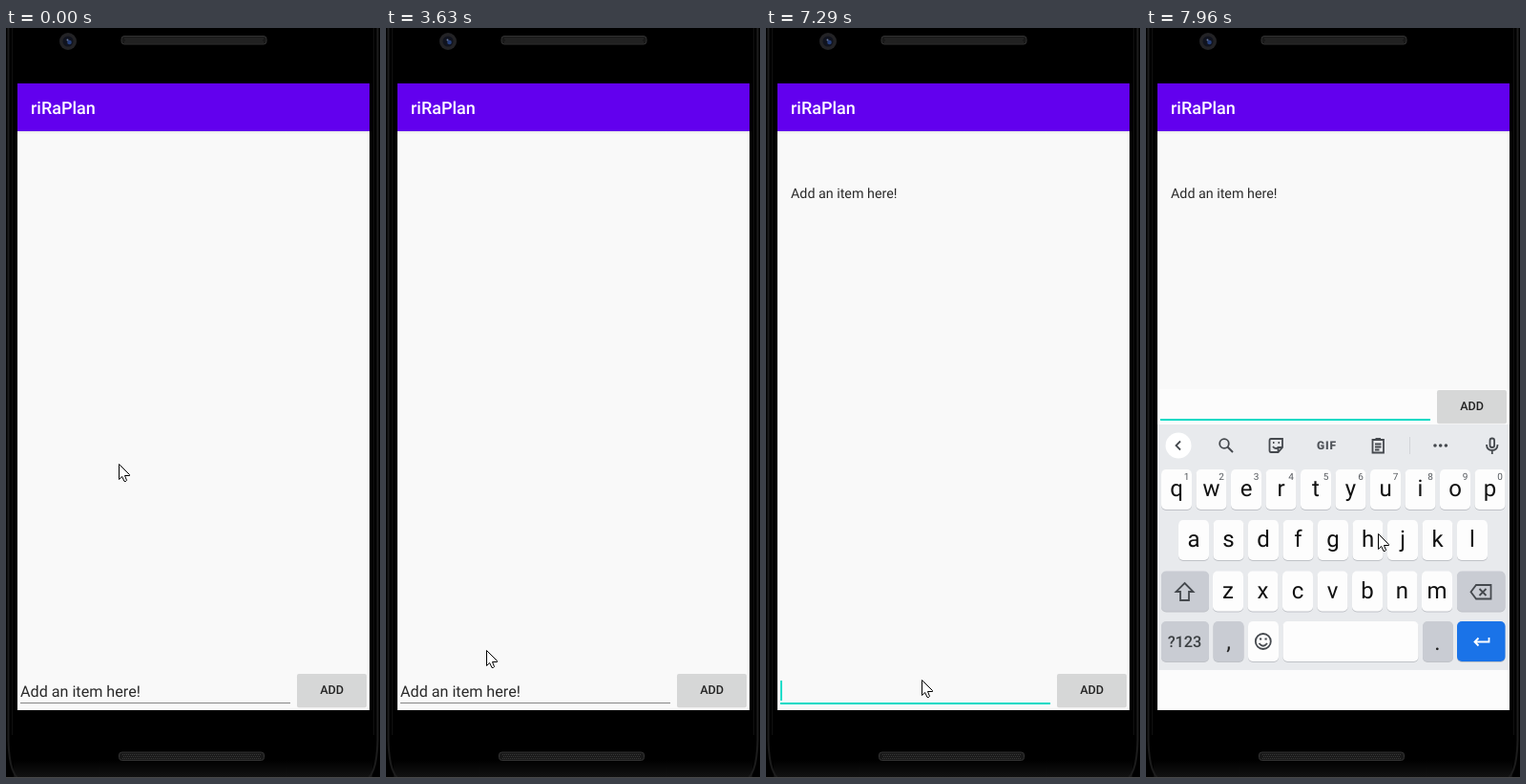
Recreate the animation shown at these times as an HTML page. Size 392 by 785 pixels, loop 8 s.

```html
<!DOCTYPE html>
<html lang="en">
<head>
<meta charset="utf-8">
<title>List app</title>
<style>
html, body { margin: 0; width: 100%; height: 100%; overflow: hidden; background: #000; }
svg { display: block; width: 100%; height: 100%; font-family: Roboto, sans-serif; text-rendering: geometricPrecision; }
.mid { text-anchor: middle; }
.med { font-weight: 500; }
.line { fill: none; stroke: #45494e; stroke-width: 1.8; }
</style>
</head>
<body>
<svg viewBox="0 0 392 785">
  <defs>
    <clipPath id="screen"><path d="M12 58H381V714H12Z"/></clipPath>
    <linearGradient id="drop" x2="0" y2="1"><stop stop-color="#e6e6e6"/><stop offset="1" stop-color="#f9f9f9"/></linearGradient>
    <linearGradient id="base" x2="0" y2="1"><stop stop-color="#000"/><stop offset="1" stop-color="#121212"/></linearGradient>
    <g id="mesh">
      <rect x=".5" y=".5" width="152" height="8.5" rx="3" fill="#191919" stroke="#333"/>
      <path d="M4 3H149M5 5H149M4 7H149" stroke="#383838" stroke-dasharray="1 1"/>
    </g>
  </defs>

  <!-- phone body -->
  <path d="M8 766H384V784H8Z" fill="url(#base)"/>
  <path d="M2.5 0V745Q3 776 12 785M389.5 0V745Q389 776 380 785" fill="none" stroke="#1c1c1c" stroke-width="2"/>
  <path d="M6.5 0V740M385.5 0V740" stroke="#101010"/>
  <path d="M0 784.5H392" stroke="#484848"/>
  <use href="#mesh" x="120.5" y="8"/>
  <use href="#mesh" x="118" y="757.5"/>
  <circle cx="65" cy="14" r="9" fill="#232326"/>
  <circle cx="65" cy="14" r="5.5" fill="#10131e"/>
  <circle cx="66.5" cy="15" r="2.3" fill="#263f7c"/>
  <circle cx="64.5" cy="12.5" r="1" fill="#6f83b0"/>

  <g clip-path="url(#screen)">
    <path d="M12 58H381V714H12Z" fill="#f9f9f9"/>
    <path d="M12 58H381V108H12Z" fill="#6200ee"/>
    <path d="M12 108H381V111H12Z" fill="url(#drop)"/>
    <text class="med" x="26" y="90" font-size="18" fill="#fff">riRaPlan</text>
    <text id="item" x="26" y="178" font-size="14.3" fill="#2a2a2a">Add an item here!</text>
    <path id="blank" d="M12 378H381V714H12Z" fill="#fcfcfc"/>
    <g id="row">
      <text id="entry" x="15" y="699.5" font-size="16.15" fill="#2a2a2a">Add an item here!</text>
      <path id="rule"/>
      <path id="caret" d="M16 683V704" stroke="#03dac5" stroke-width="1.8"/>
      <rect x="305" y="677.3" width="73" height="34" rx="2" fill="#000" opacity=".14"/>
      <rect x="305" y="676" width="73" height="34" rx="2" fill="#d6d7d7"/>
      <rect id="press" x="305" y="676" width="73.5" height="36" rx="2"/>
      <text class="mid med" x="341.5" y="697" font-size="12.56" fill="#222">ADD</text>
    </g>
    <g id="board">
      <path d="M12 415H381V672H12Z" fill="#e8eaed"/>
      <g id="keys"></g>
      <circle cx="34" cy="437" r="13.5" fill="#fff"/>
      <g class="line">
        <path d="M36 432.5L31.5 437L36 441.5"/>
        <circle cx="82" cy="435" r="4.8"/><path d="M85.5 438.5L91 444" stroke-width="2"/>
        <path d="M131 430H143V439L138.5 444H131Q129.5 444 129.5 442V432Q129.5 430 131 430ZM143 439H138.5V444M133 438Q135 441 138 439.5M133 434H134.5M138.5 434H140"/>
        <path d="M237.5 431H249V444.5H237.5ZM240 435.5H246.5M240 438.5H246.5M240 441.5H244.5"/>
        <path d="M240.5 430.5H246" stroke-width="3"/>
        <path d="M276.5 428V446" stroke="#d3d5d9" stroke-width="1"/>
        <path d="M303 437H316" stroke-width="3.6" stroke-linecap="round" stroke-dasharray="0 5.7"/>
        <rect x="360.5" y="429.5" width="4.6" height="9.5" rx="2.3"/>
        <path d="M357 436Q357 442 362.8 442Q368.5 442 368.5 436M362.8 442V446"/>
        <path d="M40.5 581L49.5 590H45V599H36V590H31.5Z"/>
        <path d="M346 583H361.5V597.5H346L340.5 590.2ZM349.5 587L356.5 594M356.5 587L349.5 594"/>
        <circle cx="122.8" cy="642" r="8"/>
        <path d="M118.5 644Q122.8 649.5 127 644"/>
        <path d="M119 639.5H121.2M124.5 639.5H126.7" stroke-width="2.2"/>
        <path d="M359.5 638V642.5H344.5M348.5 638.5L344.5 642.5L348.5 646.5" stroke="#fff"/>
      </g>
      <text class="mid" x="189.5" y="441.3" font-size="12" font-weight="900" letter-spacing=".8" fill="#50545a">GIF</text>
    </g>
  </g>
  <path id="arrow" d="M.5 .5V16.5L3.7 13.5L6 18.5H7.5L8.5 17.5L6.5 12.5H11.5V11.5Z" fill="#fff" stroke="#000" stroke-linejoin="round"/>
</svg>

<script>
const $ = id => document.getElementById(id);
const LOOP = 8000;

// Keyboard
const GREY = "#c9ccd3", WHITE = "#fdfdfd";
let keys = "";
function key(x, y, w, fill = WHITE) {
  const box = (dy, color) => `<rect x="${x}" y="${y + dy}" width="${w}" height="42" rx="5" fill="${color}"/>`;
  keys += box(1, "#bfc2c7") + box(0, fill);
}
function label(text, x, y, size = 24, fill = "#111", cls = "mid") {
  keys += `<text class="${cls}" x="${x}" y="${y}" font-size="${size}" fill="${fill}">${text}</text>`;
}
[["qwertyuiop", 32, 462], ["asdfghjkl", 50, 515], ["zxcvbnm", 86, 568.5]].forEach(([letters, x0, y], row) => {
  [...letters].forEach((c, i) => {
    const x = x0 + i * 36.5;
    key(x - 16, y, 32);
    label(c, x, y + 28);
    if (!row) label((i + 1) % 10, x + 10.5, y + 11, 10, "#55595e");
  });
});
key(16, 568.5, 50, GREY);
key(326, 568.5, 50.5, GREY);
key(16, 621, 50, GREY);
key(70.5, 621, 32, GREY);
key(107, 621, 32);
key(143.5, 621, 142);
key(290, 621, 32, GREY);
key(326, 621, 50.5, "#1a73e8");
label("?123", 40.5, 648, 16.3, "#3c4043", "mid med");
label(",", 86.5, 650, 24, "#222");
label(".", 305.5, 651, 24, "#222");
$("keys").innerHTML = keys;

// Pointer stops: time, x, y; no position means hidden
const stops = [
  [0, 118, 456], [500, 190, 545], [620, 270, 642], [770, 299, 725], [900, 308, 773], [1050],
  [2170, 138, 739], [2290], [3630, 105, 651], [3750],
  [3900, 163, 674], [4020, 61, 406], [4170, 200, 491], [4320, 178, 575], [4440, 136, 651],
  [4590, 155, 692], [4740, 262, 704], [4860, 359, 713], [5010, 378, 708], [5130, 372, 700],
  [5250, 358, 694], [5400, 353, 691], [6780, 285, 688], [6900, 195, 684], [7020, 163, 682],
  [7840, 205, 605], [7960, 243, 529]
];
const show = (id, on) => $(id).setAttribute("visibility", on ? "visible" : "hidden");
const move = (id, x, y) => $(id).setAttribute("transform", `translate(${x} ${y})`);

function draw(t) {
  const [, x, y] = stops.findLast(s => s[0] <= t);
  show("arrow", x !== undefined);
  if (x !== undefined) move("arrow", x, y);

  const added = t >= 6390, focus = t >= 7290, typing = t >= 7570;
  show("item", added);
  show("entry", !added);
  $("press").setAttribute("opacity", t < 6240 || t >= 6510 ? 0 : added ? .06 : .12);
  show("caret", focus && t < 7840);
  $("rule").setAttribute("d", `M15 706H298V${focus ? 707.9 : 707}H15Z`);
  $("rule").setAttribute("fill", focus ? "#03dac5" : "#858585");

  show("blank", typing);
  show("board", typing);
  move("row", 0, typing ? -297 : 0);
  move("board", 0, t < 7690 ? 48 : 0);
}
function tick(now) {
  draw(now % LOOP);
  requestAnimationFrame(tick);
}
draw(0);
requestAnimationFrame(tick);
</script>
</body>
</html>
```
